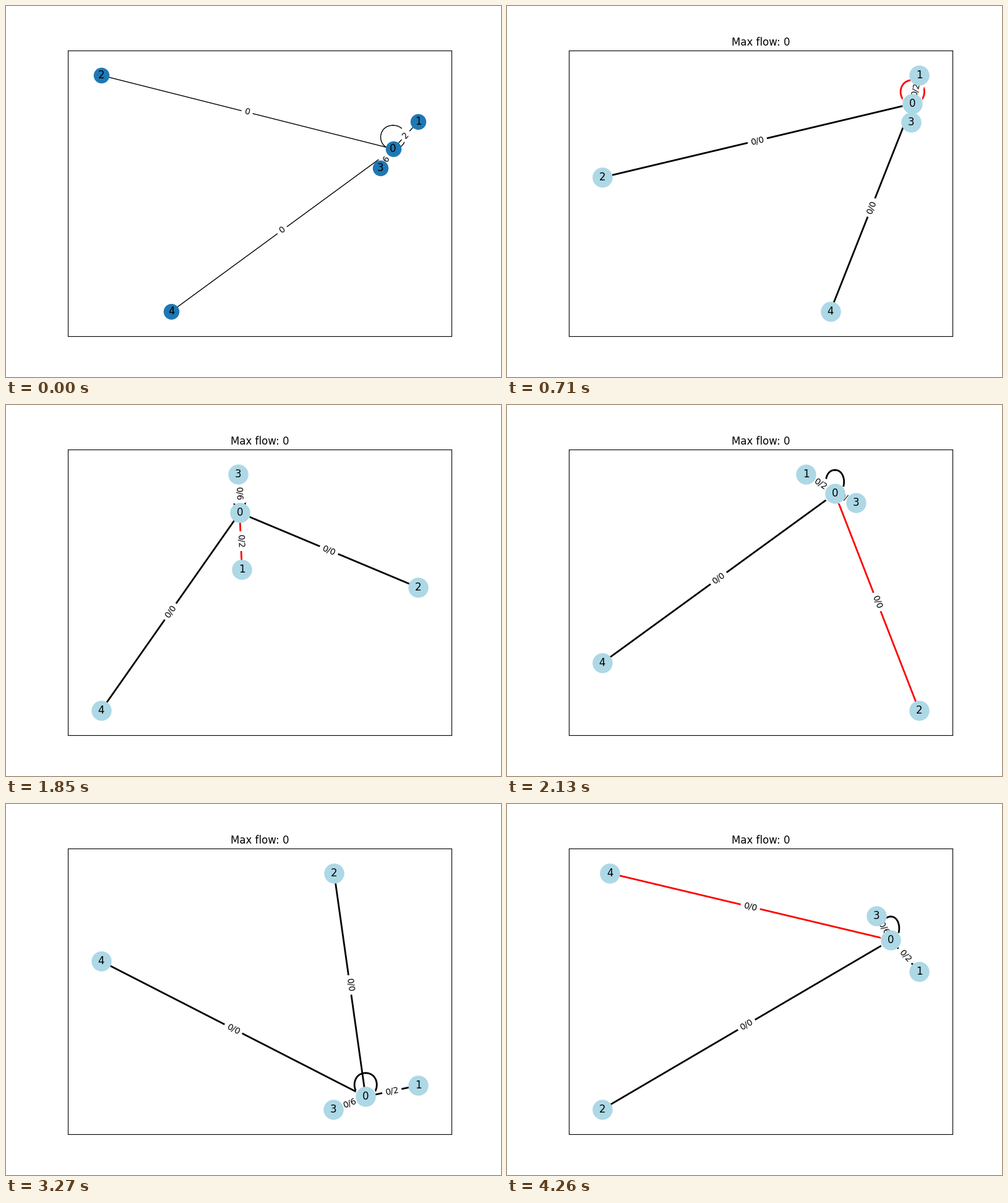
Recreate the animation shown at these times as a matplotlib script. Size 800 by 600 pixels, loop 4.97 s.

```python
import math

import matplotlib.pyplot as plt
from matplotlib.animation import FuncAnimation
from matplotlib.collections import LineCollection
from matplotlib.patches import PathPatch
from matplotlib.path import Path

CAPACITY = [5, 2, 0, 6, 0]  # edge from node 0 to node k; k = 0 is the loop
LEFT, RIGHT, TOP, BOTTOM = 153.8, 666.2, 112.1, 493.9

# Per step: node positions in pixels, loop width factor, highlighted edge
STEPS = [
    ([(625.5, 231.2), (RIGHT, 187.2), (LEFT, TOP), (605.3, 262.2), (267.3, BOTTOM)], 1.04, None),
    ([(655.3, 158), (RIGHT, TOP), (LEFT, 277.3), (653.3, 188.2), (522.5, BOTTOM)], 1.0, 0),
    ([(377.7, 174.3), (381.3, 266.2), (RIGHT, 295.2), (375.3, TOP), (LEFT, BOTTOM)], 0.46, 1),
    ([(530, 143.3), (483.3, TOP), (RIGHT, BOTTOM), (564.3, 158.3), (LEFT, 417.2)], 0.765, 2),
    ([(581.2, 473.2), (RIGHT, 455.2), (530.3, TOP), (529.3, BOTTOM), (LEFT, 254.2)], 0.94, 3),
    ([(393.3, 159.2), (371.3, TOP), (RIGHT, 347.2), (407.2, 190.2), (LEFT, BOTTOM)], 0.62, 4),
    ([(620.2, 220.2), (RIGHT, 271.2), (LEFT, BOTTOM), (597.2, 181.2), (166.3, TOP)], 0.71, 4),
]

fig = plt.figure(figsize=(8, 6), dpi=100)
ax = fig.add_subplot()


def loop_path(x, y, factor):
    rise = 0.1 * (BOTTOM - TOP)
    side = 0.05 * (RIGHT - LEFT) * factor
    points = [(x, y - rise),
              (x + side, y - rise), (x + side, y), (x, y),
              (x - side, y), (x - side, y - rise), (x, y - rise)]
    return Path(points, [Path.MOVETO] + [Path.CURVE4] * 6)


def upright_angle(a, b):
    angle = math.degrees(math.atan2(a[1] - b[1], b[0] - a[0]))
    if angle > 90:
        angle -= 180
    elif angle < -90:
        angle += 180
    return angle


def edge_label(a, b, text):
    ax.text((a[0] + b[0]) / 2, (a[1] + b[1]) / 2, text, size=10,
            ha="center", va="center", rotation=upright_angle(a, b),
            bbox=dict(boxstyle="round", ec="white", fc="white"),
            zorder=1, clip_on=True)


def draw(step):
    nodes, factor, active = STEPS[step]
    plain = active is None
    hub = nodes[0]
    width = 1 if plain else 2
    colors = ["red" if k == active else "black" for k in range(len(nodes))]

    ax.clear()
    ax.set(xlim=(100, 720), ylim=(534, 72), xticks=[], yticks=[])
    if not plain:
        ax.set_title("Max flow: 0")

    ax.add_collection(LineCollection([(hub, p) for p in nodes[1:]],
                                     colors=colors[1:], linewidths=width, zorder=1),
                      autolim=False)
    ax.add_patch(PathPatch(loop_path(*hub, factor), fc="none", ec=colors[0],
                           lw=width, capstyle="round", zorder=1))
    for p, cap in zip(nodes, CAPACITY):
        edge_label(hub, p, f"{cap}" if plain else f"0/{cap}")

    ax.scatter(*zip(*nodes), s=300 if plain else 500,
               c="#1f78b4" if plain else "lightblue", linewidths=1, zorder=2)
    for k, (x, y) in enumerate(nodes):
        ax.text(x, y, str(k), size=12, ha="center", va="center", clip_on=True)
    return ax.get_children()


anim = FuncAnimation(fig, draw, frames=len(STEPS), interval=710,
                     init_func=lambda: draw(0), repeat=True)
plt.show()
```
